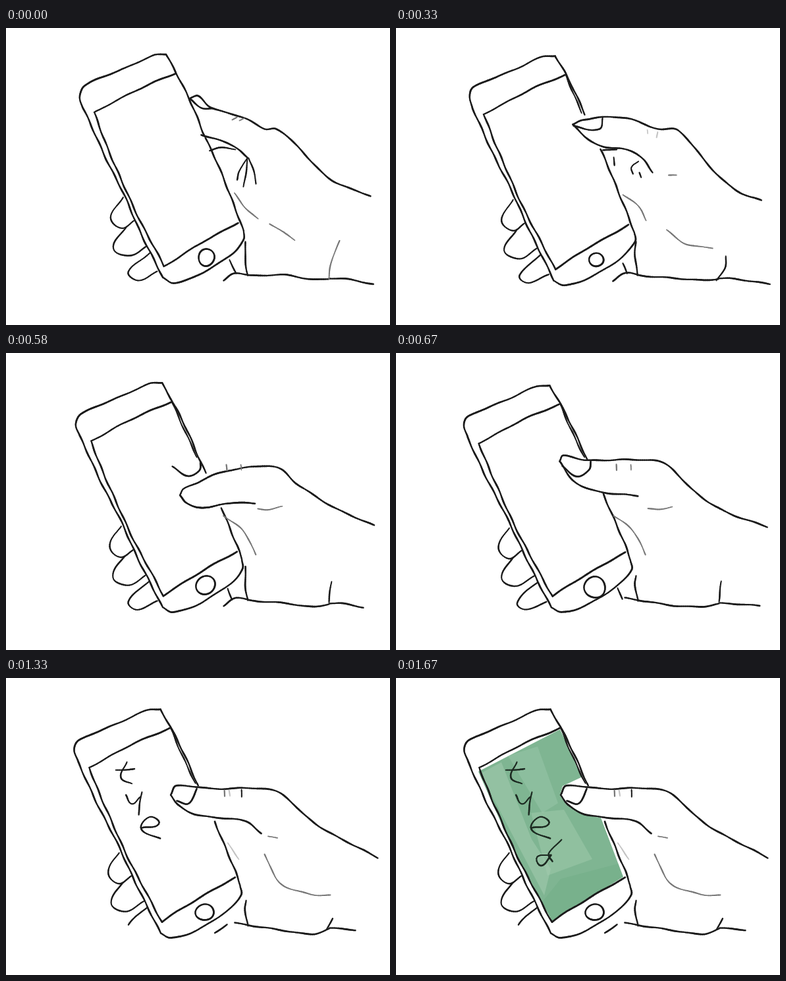
An HTML page with a canvas for the animation above (5.08 s loop, 583 px wide and 451 px high).

```html
<!DOCTYPE html>
<html lang="en">
<head>
<meta charset="utf-8">
<title>Hand and phone sketch</title>
<style>
html, body { margin: 0; width: 100%; height: 100%; overflow: hidden; background: #fff; }
canvas { display: block; width: 583px; height: 451px; }
</style>
</head>
<body>
<canvas id="stage" width="583" height="451"></canvas>
<script>
const ctx = document.getElementById('stage').getContext('2d');
const LOOP = 5080, STEP = 250 / 3;
const INK = '#1b1b1b', GREY = '#777', PALE = '#c4c4c4';

// Phone and fingers are shared by all poses and only shifted.
const phone = {
  cap: '242 41 222 43 180 62 118 89 111 104 116 122',
  side: '116 122 148 193 178 254 205 315 238 382',
  base: '238 382 254 390 290 379 340 348 361 324 360 310',
  top: '257 70 205 92 133 130',
  left: '133 130 155 187 195 278 240 365',
  bottom: '240 365 290 333 352 298'
};
const edge = '242 41 257 68 283 122 300 163 320 207 352 287 360 310';
const inner = '257 70 271 104 294 154';
const fingers = [
  '177 260 159 290 175 307 194 295',
  '182 305 163 337 186 349 213 334',
  '218 344 186 374 200 386 230 373'
];

// shift: phone offset at its top and bottom; gap: part of the right edge behind the thumb
const still = {
  shift: [1, -1, 0, -3], gap: [165, 165], btn: [304, 348, 12, 13], sag: [375, 382], cuff: [557, 389],
  back: '280 107 292 103 312 121 360 136 393 153 410 153 440 177 490 228 553 255',
  under: '297 162 325 171 350 182 368 198',
  nail: '280 108 297 121 314 122',
  ink: '309 186 325 182 348 184/367 198 353 218 351 230/367 200 361 241/369 198 375 215 380 237/339 352 350 372',
  grey: '343 139 350 135/354 140 361 137/347 250 362 272 383 290/400 297 439 322/507 323 495 350 490 381'
};
const lifted = {
  shift: [-1, -2, 1, 0], gap: [165, 165], btn: [309, 347, 16, 14], sag: [382, 386], cuff: [567, 381],
  back: '283 108 297 90 320 112 360 134 418 153 440 172 500 233 557 263',
  under: '281 106 293 138 325 160 345 172 368 194',
  nail: '288 96 300 112 321 113',
  ink: '313 184 340 181 368 194/367 196 375 218 380 244/339 355 347 371/498 336 489 382',
  grey: '363 194 350 212 347 230/364 210 368 240/330 198 332 210/343 137 350 133/356 141 361 136/369 146 374 143/344 242 380 298/408 300 445 332 480 340'
};
const touch = {
  shift: [0, 1, 2, 1], gap: [133, 184], btn: [304, 352, 11, 10], sag: [380, 383], cuff: [568, 389],
  back: '268 147 285 139 345 136 400 154 428 155 470 203 512 244 555 262',
  under: '268 147 290 167 315 181 345 183 375 199 390 219',
  nail: '269 149 308 154 314 137',
  ink: '314 186 335 184/330 196 332 208/368 203 358 212 360 222/370 220 372 227/344 357 351 373/501 347 499 365 487 383',
  grey: '414 224 426 223/345 253 367 270 380 292/411 307 440 328 481 334',
  pale: '381 154 382 160/397 158 396 166'
};
const swiped = {
  shift: [-2, 0, 1, 3], gap: [202, 257], btn: [304, 349, 13, 12], sag: [376, 386], cuff: [532, 389],
  back: '279 268 295 235 316 207 345 191 412 176 440 195 500 230 553 260',
  under: '279 268 290 277 325 265 350 243 390 240',
  ink: '312 190 330 183 357 188/352 240 356 248/385 241 394 233/390 240 404 245 417 234/404 244 425 248 446 240/341 354 346 368/505 324 495 350 490 382',
  grey: '442 261 454 255/456 284 482 269/388 266 445 328 482 339/447 324 470 324 480 316',
  pale: '347 262 378 286 373 306'
};
const back = {
  shift: [-9, 8, -2, 4], gap: [163, 212], btn: [302, 356, 16, 16], sag: [384, 385], cuff: [552, 384],
  back: '248 165 254 156 290 163 350 162 408 168 450 208 500 241 564 264',
  under: '248 165 270 194 300 209 367 217',
  nail: '252 172 275 187 293 178 295 165',
  ink: '337 357 343 374/490 378 494 347',
  grey: '334 169 335 178/356 170 357 178/383 236 400 238 420 233/330 247 360 270 379 306'
};
const typing = {
  shift: [-8, 6, -3, 5], gap: [165, 217], btn: [302, 356, 14, 12], sag: [384, 389], cuff: [530, 383],
  back: '250 178 258 164 310 168 410 172 455 210 490 234 565 273',
  under: '250 178 262 193 290 208 365 218 388 236',
  nail: '260 187 278 190 289 168',
  ink: '317 387 335 374/357 170 358 181/486 382 496 366',
  grey: '398 241 412 243/393 268 415 310 460 328 492 330/331 170 332 179',
  pale: '336 250 354 276/338 170 340 179'
};
const poses = [still, lifted, touch, swiped, back, typing];

const letters = [
  '183 127 175 151 191 160/167 140 195 138',
  '182 177 192 191 204 181/206 174 201 208',
  '207 228 232 221 218 211 206 230 234 243',
  '236 268 215 272 220 285 236 269/251 246 232 266 238 278'
];
const screenArea = '125 142 249 78 283 150 253 164 249 178 262 193 290 209 311 212 345 302 237 369 175 255';

const lerp = (a, b, k) => a + (b - a) * k;
const mix = (a, b, k) => a.map((v, i) => lerp(v, b[i], k));

function parse(text) {
  const n = text.split(' ').map(Number), pts = [];
  for (let i = 0; i < n.length; i += 2) pts.push([n[i], n[i + 1]]);
  return pts;
}

// Smooth line through the points; tangents are scaled to each span
function curve(pts) {
  const last = pts.length - 1, out = [];
  const dir = i => {
    const p = pts[Math.max(0, i - 1)], q = pts[Math.min(last, i + 1)];
    const d = Math.hypot(q[0] - p[0], q[1] - p[1]) || 1;
    return [(q[0] - p[0]) / d, (q[1] - p[1]) / d];
  };
  for (let i = 0; i < last; i++) {
    const p = pts[i], q = pts[i + 1], u = dir(i), v = dir(i + 1);
    const d = Math.hypot(q[0] - p[0], q[1] - p[1]), n = Math.ceil(d / 3);
    for (let j = 0; j < n; j++) {
      const t = j / n, s = 1 - t, ease = t * t * (3 - 2 * t);
      out.push([0, 1].map(c => lerp(p[c], q[c], ease) + d * t * s * (s * u[c] - t * v[c])));
    }
  }
  return [...out, pts[last]];
}

// Even spacing along the length, so that two strokes can be blended
function resample(line, count = 100) {
  const len = [0], out = [];
  for (let i = 1; i < line.length; i++)
    len.push(len[i - 1] + Math.hypot(line[i][0] - line[i - 1][0], line[i][1] - line[i - 1][1]));
  for (let n = 0, i = 1; n <= count; n++) {
    const d = len[len.length - 1] * n / count;
    while (i < line.length - 1 && len[i] < d) i++;
    out.push(mix(line[i - 1], line[i], (d - len[i - 1]) / (len[i] - len[i - 1] || 1)));
  }
  return out;
}

let seed = 0;
const wobble = ([x, y]) => [x + .6 * Math.sin(y * .15 + seed), y + .6 * Math.sin(x * .13 + seed * 2)];

function stroke(line, color = INK, width = 2.5) {
  const pts = line.map(wobble);
  ctx.strokeStyle = color;
  ctx.lineCap = 'round';
  for (let i = 1; i < pts.length; i++) {
    const [x, y] = pts[i];
    ctx.lineWidth = width + .3 * Math.sin(x * .13 + y * .19);
    ctx.beginPath();
    ctx.moveTo(...pts[i - 1]);
    ctx.lineTo(x, y);
    ctx.stroke();
  }
}

function marks(text, color, width) {
  if (text) text.split('/').forEach(s => stroke(curve(parse(s)), color, width));
}

function drawPhone(pos) {
  const i = Math.floor(pos), k = pos - i, a = poses[i], b = poses[i + 1] || a;
  const [tx, ty, bx, by] = mix(a.shift, b.shift, k);
  const gap = mix(a.gap, b.gap, k);
  const place = text => curve(parse(text).map(([x, y]) => {
    const f = (y - 40) / 350;
    return [x + lerp(tx, bx, f), y + lerp(ty, by, f)];
  }));
  Object.values(phone).forEach(s => stroke(place(s)));
  const right = place(edge);
  stroke(right.filter(p => p[1] <= gap[0]));
  stroke(right.filter(p => p[1] >= gap[1]));
  if (pos >= 1.5) stroke(place(inner).filter(p => p[1] < gap[0] - 4), INK, 2.1);
  fingers.forEach((s, n) => {
    const line = place(s);
    stroke(pos === 5 && n === 2 ? line.slice(0, line.length * .42) : line, INK, 2.2);
  });
  const [x, y, rx, ry] = mix(a.btn, b.btn, k), ring = [];
  for (let n = 0; n <= 40; n++) {
    const t = n * Math.PI / 20;
    ring.push([x + rx * Math.cos(t), y + ry * Math.sin(t)]);
  }
  stroke(ring);
}

function drawHand(pos) {
  const i = Math.floor(pos), k = pos - i, a = poses[i], b = poses[i + 1] || a;
  const near = k < .5 ? a : b;
  for (const part of ['back', 'under', 'nail']) {
    if (k && a[part] && b[part]) {
      const to = resample(curve(parse(b[part])));
      stroke(resample(curve(parse(a[part]))).map((p, n) => mix(p, to[n], k)));
    } else if (near[part]) {
      stroke(curve(parse(near[part])));
    }
  }
  const [mid, low] = mix(a.sag, b.sag, k), end = mix(a.cuff, b.cuff, k);
  const palm = [[347, 372], [372, 376], [425, mid], [465, low], [490, 381]];
  stroke(curve(pos < 4 ? [[330, 384], ...palm] : palm));
  stroke(curve([[490, 380], [515, 381], end]));
  stroke(curve([[364, pos < 4 ? 325 : 338], [363, 350], [367, 376]]));
  marks(near.pale, PALE, 1.8);
  marks(near.grey, GREY, 1.9);
  marks(near.ink, INK, 2.2);
}

function polygon(text) {
  ctx.beginPath();
  parse(text).forEach(p => ctx.lineTo(...p));
  ctx.closePath();
}

function paint(share) {
  ctx.save();
  polygon(screenArea);
  ctx.clip();
  ctx.fillStyle = '#7fb592';
  ctx.fillRect(100, 70, 260, 305 * share);
  ctx.beginPath();
  ctx.rect(100, 70, 260, 305 * share);
  ctx.clip();
  const wash = (color, text) => { ctx.fillStyle = color; polygon(text); ctx.fill(); };
  wash('rgba(164,204,176,.55)', '128 145 160 128 206 245 235 290 225 330');
  wash('rgba(160,202,174,.4)', '170 118 215 104 246 190 222 205');
  wash('rgba(164,204,176,.45)', '205 205 255 200 298 275 230 300');
  wash('rgba(108,168,130,.35)', '218 345 250 305 345 280 350 305 237 372');
  ctx.restore();
}

function render(time) {
  let step = 20;
  while (Math.round(step * STEP / 10) * 10 > time) step--;
  // Two swipes down and back, then the thumb rests while the word appears
  const pos = step <= 8 ? step / 2 : [3.55, 3.15, 3.55, 4.3, 4.7][step - 9] || 5;
  const written = Math.max(0, Math.min(4, step - 13));
  seed = Math.min(step, 14);
  ctx.fillStyle = '#fff';
  ctx.fillRect(0, 0, 583, 451);
  if (step > 17) paint((step - 17) / 3);
  drawPhone(step > 8 ? Math.max(4, pos) : pos);
  drawHand(pos);
  letters.slice(0, written).forEach(s => marks(s, step > 17 ? '#1d2b22' : INK, 2.3));
}

const start = performance.now();
function tick() {
  render((performance.now() - start) % LOOP);
  requestAnimationFrame(tick);
}
tick();
</script>
</body>
</html>
```
